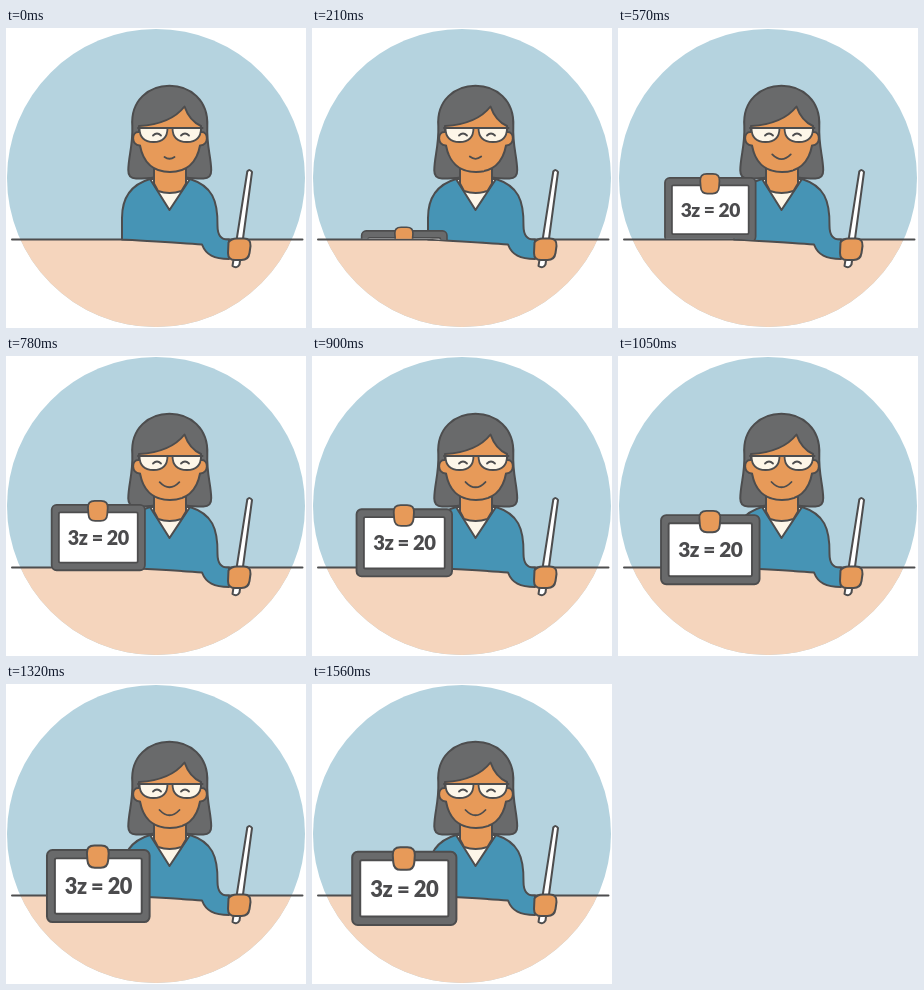
Recreate the animation shown at these times as an HTML page. Size 300 by 300 pixels, loop 1.92 s.

```html
<!DOCTYPE html>
<html lang="en">
<head>
<meta charset="utf-8">
<title>Teacher with tablet</title>
<style>
  html, body { margin: 0; width: 100%; height: 100%; overflow: hidden; background: #fff; }
  svg { display: block; width: 100vw; height: 100vh; }
  .ink { stroke: #4d4d4e; stroke-width: 2; stroke-linejoin: round; stroke-linecap: round; }
  .thin { stroke-width: 1.8; }
  .none { fill: none; }
  .hair { fill: #696a6b; }
  .skin { fill: #e79a59; }
  .cream { fill: #fdf6e8; }
  .blue { fill: #4694b5; }
  text { font: 900 22px Lato, "Open Sans", sans-serif; letter-spacing: -0.5px; fill: #4b4b4d; text-anchor: middle; }
</style>
</head>
<body>
<svg viewBox="0 0 300 300">
  <defs>
    <clipPath id="disc"><circle cx="150" cy="150" r="149"/></clipPath>
    <clipPath id="aboveDesk"><path d="M0 0H300V212.500H142L117 210.700H0Z"/></clipPath>
  </defs>

  <g clip-path="url(#disc)">
    <rect width="300" height="300" fill="#b5d3df"/>
    <rect y="211.500" width="300" height="89" fill="#f5d5bd"/>
  </g>
  <path class="ink none" d="M6 211.500H296.500"/>

  <!-- body and collar -->
  <path class="ink blue" d="M144 151C127 156 116 168 116 190V211.500C140 213 172 214.500 196 216.500C200 227 208 231 223 231V211.500C215 212 211.500 207 211.500 198C212 172 206 158 184 151Z"/>
  <path class="ink cream" d="M144 151L163.500 182L184 151Z"/>

  <!-- head -->
  <path class="ink hair" d="M148 149.500C142 150.500 136 150.500 130 150.500Q122 150.500 122.300 142C122.500 128 127 118 126.300 98C124.500 72 143 57.700 163.500 57.700C184 57.700 202.500 72 201.300 98C200.500 118 205 128 205.200 142Q205.500 150.500 197.500 150.500C191 150.500 186 150.500 180 149.500Z"/>
  <path class="ink skin" d="M148 138V155.500L152 163Q163.500 167 175.500 163L180 155.500V138Z"/>
  <path class="ink skin" d="M133 98C150 97 168 92 178.500 78.500C182 88.500 188 95 195 98V104C203 103 203 118 194 117.500C191 134 181 144 164 144C147 144 137 134 134 117.500C125 118 125 103 133 104Z"/>
  <path class="ink cream thin" d="M133.500 100H161.500C161.500 110 156 114 147.500 114C139 114 133.500 110 133.500 100Z"/>
  <path class="ink cream thin" d="M166.500 100H195C195 110 189.500 114 181 114C172.500 114 166.500 110 166.500 100Z"/>
  <path class="ink none" d="M132 100H196.500"/>
  <path class="ink none thin" d="M147 107.500Q151 103.500 155 107.500M175 107.500Q179 103.500 183 107.500"/>
  <path class="ink none thin" id="smile"/>

  <!-- pointer -->
  <path class="ink" fill="#fff" d="M241.300 143.500Q243.800 140.500 246 144L233.500 236.500Q231 241 226.500 238Z"/>
  <path class="ink skin" d="M222.500 214.500Q225 210.500 231 210.500H238Q245 210.500 244.500 218L243.500 225Q242.500 232 235.500 232H229Q222 232 222 225Z"/>

  <!-- tablet -->
  <g id="stage">
    <g id="tablet">
      <rect class="ink hair" x="-52" y="-36.500" width="104" height="73" rx="5.500"/>
      <rect class="ink" fill="#fff" x="-44" y="-28" width="88" height="56" rx="1.500"/>
      <text y="8.100">3z = 20</text>
      <path class="ink skin" d="M-11.500 -33Q-12 -41 -4 -41H3Q11 -41 10.500 -33L10 -26Q9.500 -18.500 2.500 -18.500H-3.500Q-10.500 -18.500 -11 -26Z"/>
    </g>
  </g>
</svg>
<script>
const LOOP = 1920, FRONT = 660;

// [time, value] pairs
const centerY = [[0, 251], [180, 237], [360, 208.3], [570, 181.8], [670, 180.3], [780, 181.5],
                 [1050, 193.7], [1320, 202], [1560, 204.4]];
const width = [[0, 86], [360, 88.5], [570, 92.4], [780, 95], [1050, 100.4], [1320, 104.6], [1560, 106.2]];
const grin = [[0, 0], [360, 0.35], [570, 0.85], [780, 0.97], [1080, 1]];

const stage = document.getElementById("stage");
const tablet = document.getElementById("tablet");
const smile = document.getElementById("smile");

function slope(keys, i) {
  if (i === 0 || i === keys.length - 1) return 0;
  const [a, b] = [keys[i - 1], keys[i + 1]];
  return (b[1] - a[1]) / (b[0] - a[0]);
}

// smooth curve through the keys, held after the last
function sample(keys, t) {
  const last = keys.length - 1;
  if (t >= keys[last][0]) return keys[last][1];
  let i = 0;
  while (t >= keys[i + 1][0]) i++;
  const [t0, v0] = keys[i], [t1, v1] = keys[i + 1];
  const d = t1 - t0, u = (t - t0) / d, w = 1 - u;
  return w * w * (1 + 2 * u) * v0 + u * u * (3 - 2 * u) * v1 +
         d * u * w * (w * slope(keys, i) - u * slope(keys, i + 1));
}

function draw(t) {
  const scale = sample(width, t) / 106;
  tablet.setAttribute("transform", `translate(92.3 ${sample(centerY, t)}) scale(${scale})`);
  stage.setAttribute("clip-path", t < FRONT ? "url(#aboveDesk)" : "none");

  const g = sample(grin, t);
  const half = 5 + 5 * g, y = 129 - 3 * g;
  smile.setAttribute("d", `M${163.5 - half} ${y}q${half} ${3.5 + 7 * g} ${2 * half} 0`);
}

const start = performance.now();
function tick() {
  draw((performance.now() - start) % LOOP);
  requestAnimationFrame(tick);
}
draw(0);
requestAnimationFrame(tick);
</script>
</body>
</html>
```
